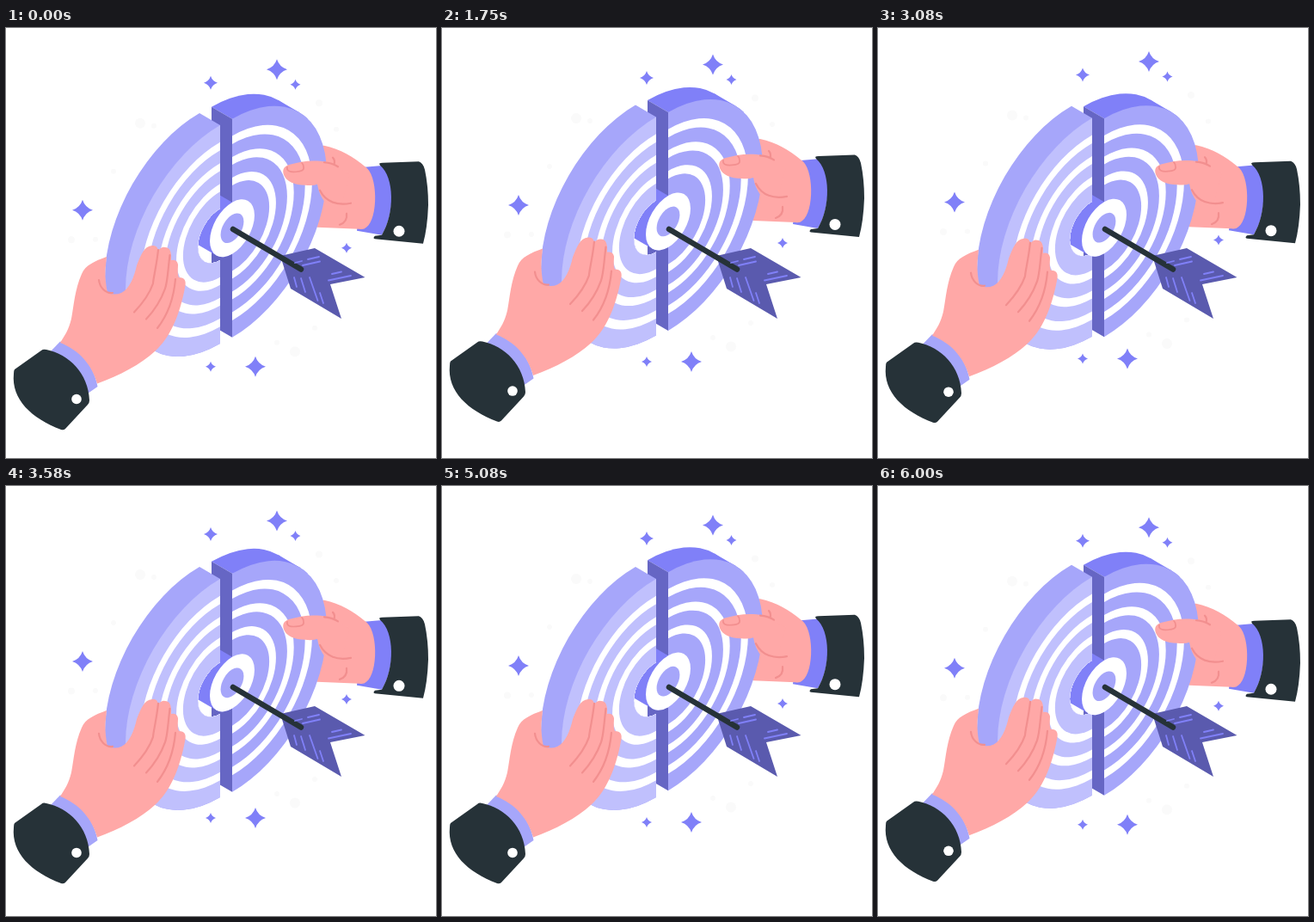
An HTML page with a canvas for the animation above (6040 ms loop, 500 by 500 pixels).

```html
<!DOCTYPE html>
<html lang="en">
<head>
<meta charset="utf-8">
<title>Target halves</title>
<style>
html, body { margin: 0; width: 100%; height: 100%; overflow: hidden; background: #fff; }
canvas { display: block; width: 500px; height: 500px; }
</style>
</head>
<body>
<canvas id="stage"></canvas>
<script>
const LOOP = 6040, LEAD = 40;
const INK = '#263238', BLUE = '#8080f8', LILAC = '#a6a6fa', PALE = '#c0c0fd';
const SHADE = '#6666c4', FLETCH = '#5a5aae', SKIN = '#ffa8a7', CREASE = '#f28f8f', DOT = '#fafafa';
const R = 127, HOLE = 30, DX = -24, DY = -14, K = Math.sqrt(3) / 2;
const RINGS = [107.3, 97.8, 82.8, 73.8, 58.8, 49.8];

const canvas = document.getElementById('stage');
const ctx = canvas.getContext('2d');
const dpr = window.devicePixelRatio || 1;
canvas.width = canvas.height = 500 * dpr;

// Circle on the isometric plane
function iso(x, y, r) {
  const path = new Path2D(), arc = new Path2D();
  arc.arc(0, 0, r, 0, Math.PI * 2);
  path.addPath(arc, new DOMMatrix([K, -0.5, 0, 1, x, y]));
  return path;
}

function fill(path, color) {
  ctx.fillStyle = color;
  ctx.fill(typeof path === 'string' ? new Path2D(path) : path);
}

function line(d, color, width) {
  ctx.strokeStyle = color;
  ctx.lineWidth = width;
  ctx.lineCap = ctx.lineJoin = 'round';
  ctx.stroke(new Path2D(d));
}

function circle(x, y, r, color) {
  const p = new Path2D();
  p.arc(x, y, r, 0, Math.PI * 2);
  fill(p, color);
}

function star(x, y, r) {
  const c = r * 0.24;
  fill(`M${x} ${y - r}Q${x + c} ${y - c} ${x + r} ${y}Q${x + c} ${y + c} ${x} ${y + r}` +
    `Q${x - c} ${y + c} ${x - r} ${y}Q${x - c} ${y - c} ${x} ${y - r}Z`, BLUE);
}

function clipped(x, w, draw) {
  ctx.save();
  ctx.beginPath();
  ctx.rect(x, -50, w, 600);
  ctx.clip();
  draw();
  ctx.restore();
}

function shifted(dy, draw) {
  ctx.save();
  ctx.translate(0, dy);
  draw();
  ctx.restore();
}

// Sweep of a disc along its thickness
function sweep(x, y, r, color) {
  fill(iso(x, y, r), color);
  fill(iso(x + DX, y + DY, r), color);
  const a = r * K * Math.SQRT1_2, b = r * 1.5 * Math.SQRT1_2;
  fill(`M${x + a} ${y - b}L${x + a + DX} ${y - b + DY}L${x - a + DX} ${y + b + DY}L${x - a} ${y + b}Z`, color);
}

function rings(x, y, base) {
  fill(iso(x, y, R), base);
  RINGS.forEach((r, i) => fill(iso(x, y, r), i % 2 ? base : '#fff'));
}

function sparkles() {
  [[156, 111, 6], [172, 114, 3], [364, 87.5, 4], [384, 118, 3], [125, 167, 3], [76, 246.5, 4],
   [104, 246, 3], [315, 366, 3], [336, 376.5, 6], [359, 349, 3]].forEach(d => circle(...d, DOT));
  [[315, 48.5, 12], [336.5, 66, 6], [238, 64, 8], [89, 212, 12], [396, 256, 6],
   [238, 394, 6], [290, 394, 12]].forEach(s => star(...s));
}

function rightBack() {
  fill('M417 162L440 160C452 174 452 216 437 241L408 236Z', BLUE);
  fill('M434 158Q435 157 438 157L480 155.500Q485 157 487 165Q491 184 491 206Q490 233 485 251L429 245.500Q426 245 429 242L437 241C452 216 452 174 435 160Z', INK);
  circle(457, 236.5, 6.5, '#fff');
  fill('M345 138L370 137C389 141 404 150 417 161C433 170 433 222 419 232Q416 235 411 234L362 232L340 220Z', SKIN);

  ctx.save();
  ctx.beginPath();
  ctx.moveTo(239, 0);
  ctx.lineTo(239, 92);
  ctx.lineTo(263, 106);
  ctx.lineTo(400, 106);
  ctx.lineTo(400, 0);
  ctx.clip();
  sweep(263, 233, R, BLUE);
  ctx.restore();

  fill('M239 180L263 194V360L239 346Z', SHADE);
  sweep(263, 233, HOLE, BLUE);
  fill('M239 92L263 106V203L239 189Z', SHADE);
}

function rightFront() {
  clipped(263, 237, () => rings(263, 233, LILAC));
  fill(iso(263, 233, HOLE), '#fff');
  fill(iso(263, 233, 15.5), LILAC);
  fill('M373 156C355 153 342 156 330 159C323 161 321 165 323 171C326 179 336 183 348 183Q357 184 362 182Q364 194 371 203L390 206L400 170Z', SKIN);
  line('M327 162C326 167 331 168 337 167.5C343 167 347 166 346 162Q346 159 344 157', CREASE, 1.7);
  line('M370 156.5Q379 157 386 161.5M380 151Q383 154 381.5 159', CREASE, 2.2);
  line('M365 189C372 203 386 207 401 204M396 216C397 223 394 227 388 229', CREASE, 2.2);
}

function leftHalf() {
  const x = 249, y = 240;
  ctx.save();
  // Everything but the hole, cut along the slanted top and the flat side
  const area = new Path2D('M0 0H225V99L249 113V500H0Z');
  area.addPath(iso(x, y, HOLE));
  ctx.clip(area, 'evenodd');
  clipped(0, x, () => {
    sweep(x, y, R, LILAC);
    rings(x, y, PALE);
  });
  ctx.restore();
}

function leftHand() {
  fill('M51 377L63 364.5C83 371 102 391 106.5 417L95 425Z', LILAC);
  fill('M117 266C103 271 92 276 88 286C80 304 79 322 76 338C73 351 68 358 63 366C84 374 100 391 106 413.5C132 404 157 391 173 376C191 360 202 334 208 302C210 294 208 290 201 290C199 285 200 281 200 275Q199 269 192 270Q193 255 185 255Q181 254 177 259Q176 252 170 253C160 254 157 264 152 276C149 290 143 304 134 308Q127 311 118 308Q115 294 115.5 281Z', SKIN);
  line('M108 293C109 302 116 309 124 308', CREASE, 2.2);
  line('M177 258C175 277 171 292 171 297C167 309 158 321 149 330.5', CREASE, 2.2);
  line('M190.5 264C188 284 188 294 185 303C180 317 172 329 163 338.5', CREASE, 2.2);
  line('M197 292C195 315 187 335 176 349', CREASE, 2.2);
  fill('M10 397L41 375Q43 373 47 374C73 379 96 402 97 433Q97 436 95 438L69 466Q67 468 64 467C30 454 6 432 9 402Q9 398 10 397Z', INK);
  circle(82, 431.5, 5.8, '#fff');
}

function arrow() {
  fill('M319 265L359 256L417.5 290L377 298L390 338L331 303Z', FLETCH);
  line('M264 234L343 280.5', INK, 6.5);
  line('M336 273L344 271M351 269L364 266M345 276L365 271.5M379 286L390 283.5M375 293.5L401 288', BLUE, 1.8);
  line('M335 290L338 301M343 291L348 307M353 290L362.5 317M365 308L369 320', BLUE, 1.8);
}

// Linear rise of 10 px and return
function bob(t, period, delay = 0) {
  if (t < delay) return 0;
  const p = (t - delay) % period / period;
  return -10 * (1 - Math.abs(2 * p - 1));
}

function draw(now) {
  const t = now % LOOP + LEAD;
  const left = bob(t, 1500, 1000), right = bob(t, 3000);
  ctx.setTransform(dpr, 0, 0, dpr, 0, 0);
  ctx.fillStyle = '#fff';
  ctx.fillRect(0, 0, 500, 500);
  shifted(bob(t, 6000), sparkles);
  shifted(right, rightBack);
  shifted(left, leftHalf);
  shifted(right, rightFront);
  shifted(left, leftHand);
  arrow();
}

const start = performance.now();
function tick() {
  draw(performance.now() - start);
  requestAnimationFrame(tick);
}
tick();
</script>
</body>
</html>
```
